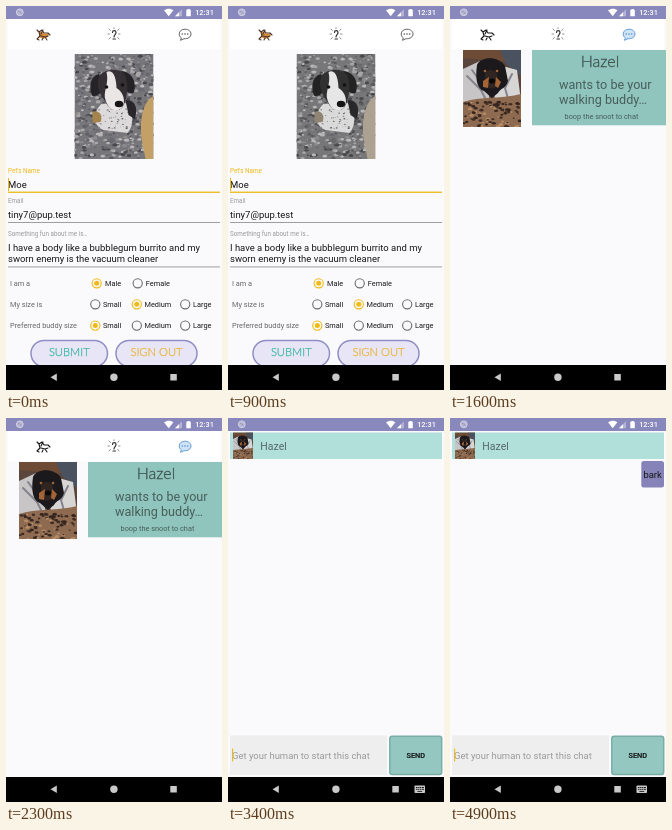
An HTML page that plays this animation: 216 by 384 pixels, repeating every 5000 ms.

```html
<!DOCTYPE html>
<html lang="en">
<head>
<meta charset="utf-8">
<title>Dog walking buddies</title>
<style>
  html, body { margin: 0; width: 100%; height: 100%; overflow: hidden; background: #faf9fb; }
  svg { display: block; width: 100vw; height: 100vh; }
  text { font-family: Roboto, sans-serif; white-space: pre; }
  .hand { font-family: Lato, sans-serif; font-weight: 300; }
</style>
</head>
<body>
<svg id="stage" viewBox="0 0 216 384"></svg>
<script>
const LOOP = 5000, STEP = 100;
const YELLOW = '#efb916', GREY = '#9a9a9c', INK = '#171719';

let seed = 7;
const rand = () => (seed = seed * 16807 % 2147483647) / 2147483647;
const pick = list => list[Math.floor(rand() * list.length)];

const text = (x, y, size, str, fill = INK, extra = '') =>
  `<text x="${x}" y="${y}" font-size="${size}" fill="${fill}" ${extra}>${str}</text>`;
const rect = (x, y, w, h, fill, extra = '') =>
  `<rect x="${x}" y="${y}" width="${w}" height="${h}" fill="${fill}" ${extra}/>`;
const circle = (x, y, r, fill, extra = '') =>
  `<circle cx="${x}" cy="${y}" r="${r}" fill="${fill}" ${extra}/>`;
const path = (d, fill, extra = '') => `<path d="${d}" fill="${fill}" ${extra}/>`;
const line = (d, color, width = 1) =>
  path(d, 'none', `stroke="${color}" stroke-width="${width}" stroke-linecap="round" stroke-linejoin="round"`);
const group = (id, body, extra = '') => `<g id="${id}" ${extra}>${body}</g>`;
const cursor = (id, x, y, h) => rect(x, y, 1.1, h, YELLOW, `id="${id}"`);

// Scattered spots inside a box
function speckle(count, x, y, w, h, size, colors) {
  let out = '';
  for (let i = 0; i < count; i++) {
    const px = x + rand() * w, py = y + rand() * h, r = size * (0.5 + rand());
    out += `<ellipse cx="${px.toFixed(1)}" cy="${py.toFixed(1)}" rx="${r.toFixed(1)}" ry="${(r * .65).toFixed(1)}" fill="${pick(colors)}"/>`;
  }
  return out;
}

// Dog on gravel, 79 x 105
const gravelDog = () => rect(0, 0, 79, 105, '#77767a') +
  speckle(620, 0, 0, 79, 105, 1.7, ['#5b5a60', '#8d8b8e', '#a9a6a8', '#696870', '#48474d', '#bab7b8']) +
  path('M79 42C68 48 65 66 67 84L71 105H79Z', '#c3a066') +
  path('M27 50C18 58 18 72 29 76L53 79C60 72 59 56 51 49Z', '#dddadb') +
  speckle(45, 24, 55, 30, 20, .8, ['#8c8a8e', '#5e5c62']) +
  path('M18 58C24 55 29 61 26 68L18 69Z', '#a4834c') +
  path('M51 46C61 45 64 55 60 65L54 61Z', '#29272b') +
  path('M24 20C15 23 14 35 18 42C24 43 29 37 30 28Z', '#252326') +
  path('M47 17C57 18 63 28 59 39C53 41 48 34 45 27Z', '#252326') +
  path('M24 25C26 15 45 12 51 22C54 32 53 45 48 53C43 59 35 56 31 48C26 41 22 33 24 25Z', '#343033') +
  path('M32 18C39 14 42 25 42 34C49 38 52 48 47 54C41 60 33 54 31 46C28 38 35 30 32 18Z', '#e9e6e5') +
  circle(32, 33, 1.8, '#111') + circle(48, 31, 1.8, '#111') +
  `<ellipse cx="44.5" cy="50" rx="4.2" ry="3.3" fill="#151416"/>`;

// Dog in blankets, 58 x 77
const blanketDog = () => rect(0, 0, 58, 77, '#59453b') +
  path('M0 0H58V13L0 8Z', '#6e4b35') + path('M37 0H58V26L43 14Z', '#4a5260') +
  path('M0 19L17 11L24 34L28 58L0 53Z', '#c8c5c7') +
  path('M36 15L54 20L58 51L32 56L31 36Z', '#d8d5d5') +
  line('M4 26L18 40L25 54M49 24L42 38L46 52M9 20L17 31', '#85838d', 2) +
  path('M0 52C16 46 41 49 58 44V77H0Z', '#8e6b50') +
  speckle(100, 1, 52, 56, 25, 1.6, ['#35251f', '#402d25', '#b58b65']) +
  path('M14 15C18 6 36 6 42 16L45 31C43 39 37 38 35 43L29 48L21 41C14 39 12 29 14 15Z', '#1b191c') +
  path('M22 23C25 19 31 19 34 24L35 34C32 40 25 40 22 34Z', '#302521') +
  path('M20 31L26 27L25 38L20 37Z M33 27L38 32L35 38L32 36Z', '#a36537') +
  circle(22, 21, 1.3, '#a36537') + circle(34, 21, 1.3, '#a36537') +
  `<ellipse cx="29" cy="31" rx="3.2" ry="2.4" fill="#0a090a"/>`;

const dogIcon = (color, fill) =>
  path('M33 26L36 26L39 28L43 27L42 31L37 33L33 31Z', fill) +
  line('M31 24L33 26L36 24L38 27H42L44 29M33 26L34 30L31 33L33 34M35 30L39 31L41 34M39 31L42 30M37 32L36 34M37 24L35 28', color, 1.1);

const bulbIcon = line('M106.5 26.5C106.5 24 110 24 110 26.5C110 28.5 108 28.6 108 31M107 33H109.5', '#333', 1.2) +
  line('M103 23L104.5 24.5M102 28H103.5M103 33L104.5 31.5M113 23L111.8 24.5M114 28H112.5M113 33L111.8 31.5M108 21.8V22.6', '#777', .8);

const chatIcon = (color, fill) =>
  path('M179 23.2C175.5 23.2 173.2 25.3 173.2 28C173.2 29.6 174 31 175.3 31.8L174.5 34.3L178 32.7C182 33 185 31 185 28C185 25.3 182.5 23.2 179 23.2Z',
    fill, `stroke="${color}" stroke-width=".9"`) +
  [176.3, 179, 181.7].map(x => circle(x, 28, .8, color)).join('');

const radio = (x, y, label, on, labelX) =>
  circle(x, y, 4.6, 'none', `stroke="${on ? YELLOW : '#6c6c6e'}" stroke-width="1.1"`) +
  (on ? circle(x, y, 2.5, YELLOW) : '') + text(labelX, y + 2.6, 7.36, label);

const radioRow = (y, label, checked) => text(4, y + 2.8, 7.36, label, '#666668') +
  ['Small', 'Medium', 'Large'].map((size, i) =>
    radio([89.3, 130.8, 179.2][i], y, size, size === checked, [97, 138.5, 187][i])).join('');

const pill = (x, w, label, color) =>
  rect(x, 334.5, w, 26, '#e8e5f6', 'rx="13" stroke="#8f8ec5" stroke-width="1.5"') +
  text(x + w / 2, 349.5, 11.2, label, color, `class="hand" text-anchor="middle" stroke="${color}" stroke-width=".25"`);

const tabs = rect(2, 13, 212, 30.5, '#fff') + bulbIcon;

const profile = tabs + dogIcon('#4b3425', '#d78b3d') + chatIcon('#555', '#fff') +
  group('portrait', gravelDog(), 'transform="translate(68.5 48)" clip-path="url(#portraitClip)"') +
  text(2, 167, 6.3, 'Pet\'s Name', YELLOW) + text(2, 182, 9.46, 'Moe') +
  cursor('nameCursor', 2, 172, 13) + rect(2, 185.6, 212, 1.3, YELLOW) +
  text(2, 196.7, 6.3, 'Email', GREY) + text(2, 212, 9.46, 'tiny7@pup.test') + rect(2, 216, 212, .7, '#777') +
  text(2, 230, 6.3, 'Something fun about me is…', GREY) +
  text(2, 245, 9.46, 'I have a body like a bubblegum burrito and my') +
  text(2, 256.3, 9.46, 'sworn enemy is the vacuum cleaner') + rect(2, 260.6, 212, .7, '#777') +
  text(4, 280, 7.36, 'I am a', '#666668') +
  radio(90.7, 277.3, 'Male', true, 99) + radio(131.7, 277.3, 'Female', false, 139.8) +
  radioRow(298.3, 'My size is', 'Medium') + radioRow(319.6, 'Preferred buddy size', 'Small') +
  pill(25, 76.5, 'SUBMIT', '#35b6a1') + pill(110, 81, 'SIGN OUT', '#eab22c');

const buddies = tabs + dogIcon('#151515', '#fff') + chatIcon('#5793d2', '#cfe3f8') +
  group('card', rect(82, 44, 134, 75.3, '#8fc5bc') +
    text(150, 61, 16, 'Hazel', '#3f514f', 'class="hand" text-anchor="middle" stroke="#3f514f" stroke-width=".3"') +
    text(109, 82.5, 12.61, 'wants to be your', '#485e5b') +
    text(109, 97.5, 12.61, 'walking buddy…', '#485e5b') +
    text(114.5, 113, 7.36, 'boop the snoot to chat', '#485e5b')) +
  group('buddyPhoto', '<use href="#buddy" transform="translate(13 44)"/>');

const chat = rect(2, 14.5, 212, 26.5, '#b1dfda') + text(32.3, 32, 10.51, 'Hazel', '#56696a') +
  group('chatPhoto', '<use href="#buddy" transform="translate(5 14.5) scale(.345)"/>') +
  group('bubble', rect(191.3, 43, 22.7, 26.5, '#8583b8', 'rx="2.5"') + text(193.4, 59.8, 9.46, 'bark')) +
  rect(2, 317.5, 157, 39.5, '#eeeeef') + text(4, 340.6, 9.46, '', INK, 'id="draft"') +
  cursor('draftCursor', 4, 330.5, 13) +
  rect(161.8, 318.2, 51.9, 38.3, '#93c7c0', 'id="send" rx="2.5" stroke="#79aea7" stroke-width="1.5"') +
  text(187.8, 340, 7.36, 'SEND', '#111', 'font-weight="500" text-anchor="middle" stroke="#111" stroke-width=".15"');

const systemBars = rect(0, 0, 216, 13, '#8988bd') +
  circle(13.8, 6.3, 3.4, '#b9b8d4', 'stroke="#d2d1e3" stroke-width="1"') +
  line('M12 5L15.5 7.5', '#8f8eb7', .8) +
  path('M158 4.3C161 2.2 165 2.2 167.4 4.3L162.7 10.3Z', '#fff') +
  path('M169 10.3L176 3.3V10.3Z', '#b4b3d6') + path('M169 10.3L173 6.3V10.3Z', '#fff') +
  path('M180.3 3.8H181.5V2.9H183.7V3.8H184.8V10.3H180.3Z', '#fff') +
  text(189.2, 9.2, 7.36, '12:31', '#fff', 'font-weight="500"') +
  rect(0, 359, 216, 25, '#000') +
  path('M44.5 371.3L50.8 367.5V375.1Z', '#c9c9c9') + circle(107.9, 371.3, 3.7, '#c9c9c9') +
  rect(164.3, 368, 6.5, 6.5, '#c9c9c9') +
  group('keyboard', rect(186.5, 367.5, 10.5, 7.5, '#c9c9c9', 'rx=".8"') +
    line('M188.3 369.5H195.5M188.3 371.3H195.5', '#000', .9) + line('M189.8 373.4H193.8', '#000', .8) +
    line('M189.7 368.5V372M191.6 368.5V372M193.5 368.5V372', '#c9c9c9', .6));

document.getElementById('stage').innerHTML = `<defs>
  <clipPath id="portraitClip">${rect(0, 0, 79, 105, '#000')}</clipPath>
  <clipPath id="buddyClip">${rect(0, 0, 58, 77, '#000')}</clipPath>
  <g id="buddy" clip-path="url(#buddyClip)">${blanketDog()}</g></defs>` +
  rect(0, 0, 216, 384, '#faf9fb') + group('profile', profile) + group('buddies', buddies) +
  group('chat', rect(0, 13, 216, 346, '#faf9fb') + chat) + systemBars;

const el = id => document.getElementById(id);
const show = (id, on) => { el(id).style.display = on ? '' : 'none'; };
const within = (t, from, to = LOOP) => t >= from && t < to;

function render(t) {
  show('profile', t < 1000);
  show('nameCursor', !within(t, 200, 700));
  el('portrait').style.filter = t < STEP ? 'none' : 'saturate(.3)';

  show('buddies', within(t, 1000, 2700));
  show('card', t >= 1200);
  show('buddyPhoto', t >= 1400);

  // The chat fades in while rising slightly
  const enter = t < 2400 ? 0 : Math.min(1, (t - 2400) / 250);
  show('chat', enter > 0);
  el('chat').style.opacity = enter;
  el('chat').setAttribute('transform', `translate(0 ${24 * (1 - enter) ** 2})`);
  show('chatPhoto', t >= 2900);
  show('keyboard', t >= 3100);

  const typed = within(t, 3500, 4500) ? 'bark'.slice(0, Math.floor((t - 3400) / 100)) : '';
  const draft = el('draft');
  draft.textContent = typed || 'Get your human to start this chat';
  draft.setAttribute('fill', typed ? INK : GREY);
  el('draftCursor').setAttribute('x', 4 + (typed ? draft.getComputedTextLength() : 0));
  show('draftCursor', within(t, 3100, 4200) || within(t, 4500, 4800) || t >= 4900);
  el('send').setAttribute('fill', within(t, 4400, 4600) ? '#82b5ae' : '#93c7c0');
  show('bubble', t >= 4500);
}

function tick() {
  render(Math.floor(performance.now() % LOOP / STEP) * STEP);
  requestAnimationFrame(tick);
}
tick();
</script>
</body>
</html>
```
